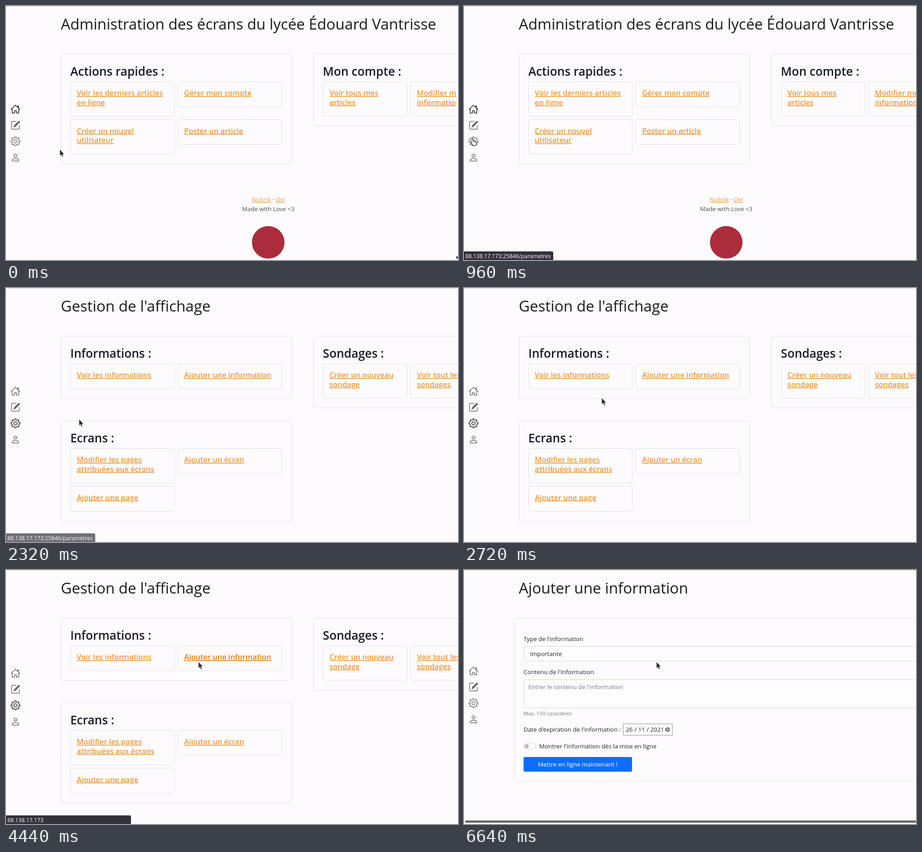
Animation, 998 px wide and 561 px high, one loop 6680 ms. Source, as an HTML page:

```html
<!DOCTYPE html>
<html lang="fr">
<head>
<meta charset="utf-8">
<title>Administration des écrans</title>
<style>
  html, body { margin: 0; width: 100%; height: 100%; overflow: hidden; background: #fdfbfe; }
  svg { display: block; width: 998px; height: 561px; }
  text { font-family: "Open Sans", "Noto Sans", sans-serif; font-size: 13.3px; fill: #23242c; white-space: pre; }
  .title { font-size: 33.2px; fill: #1a1b22; }
  .head { font-size: 26.2px; font-weight: 600; fill: #1a1b28; }
  .link { font-size: 16.4px; font-weight: 600; }
  .link, .a { fill: #ec9838; text-decoration: underline; }
  .hover { fill: #de7f0c; }
  .foot { text-anchor: middle; fill: #4c4d54; }
  .muted { fill: #737b88; }
  .small { font-size: 11.5px; }
  .url { font-size: 12.25px; fill: #fff; }
  .box { fill: none; stroke: #dfdee6; }
  .field { fill: #fdfdfe; stroke: #d0d2d6; }
  .icon { fill: none; stroke: #68686e; stroke-width: 1.1; stroke-linejoin: round; stroke-linecap: round; }
  .icon.on { stroke: #1c1c22; }
</style>
</head>
<body>
<svg viewBox="0 0 998 561">
  <path d="M0 .5H998" stroke="#cbcbc4"/>
  <g id="home"></g>
  <g id="display"></g>
  <g id="form"></g>
  <g id="menu"></g>
  <g id="edge"><path d="M994 1h4v560h-4z" fill="#fdfbfe"/><path d="M994 553h4v5h-4z" fill="#55555f"/></g>
  <g id="status">
    <path id="bubble" fill="#33313b"/>
    <text id="url" class="url" x="3" y="556.5"></text>
  </g>
  <path id="arrow" d="M0 0v14l3.200-2.600 2.300 5 2.300-1-2.200-4.900h4.400z" fill="#2a2a32" stroke="#fff" stroke-width=".5"/>
  <path id="hand" d="M-.5-1q1.400-2.200 2.800 0v4.500l5 1q3 .7 2.600 3.700l-1.200 4.700H2l-4.300-5.200q-1-2 1-1.800l.8.900zM4.500 4v2.500M7 4.500v2.200" fill="#fff" stroke="#2a2a32" stroke-width="1.1" stroke-linejoin="round"/>
</svg>
<script>
const LOOP = 6680, HOST = '88.138.17.173';
const SETTINGS = HOST + ':25846/parametres';
const el = id => document.getElementById(id);
const show = (id, on) => { el(id).style.display = on ? '' : 'none'; };

const text = (x, y, s, cls = '') => `<text x="${x}" y="${y}" class="${cls}">${s}</text>`;
const rect = (x, y, right, bottom, cls = 'box', r = 3.5) =>
  `<rect x="${x + .5}" y="${y + .5}" width="${right - x - 1}" height="${bottom - y - 1}" rx="${r}" class="${cls}"/>`;

// A link tile; "|" separates its lines
const tile = (x, y, right, label, id = '') => {
  const lines = label.split('|');
  return rect(x, y, right, y + (lines.length > 1 ? 77 : 56)) +
    `<g id="${id}">` + lines.map((s, i) => text(x + 14.3, y + 31 + i * 20.7, s, 'link')).join('') + '</g>';
};
const card = (x, y, right, bottom, head) => rect(x, y, right, bottom) + text(x + 21, y + 48, head, 'head');

el('home').innerHTML =
  text(121, 52, 'Administration des écrans du lycée Édouard Vantrisse', 'title') +
  card(121, 106, 631, 349, 'Actions rapides :') +
  tile(142, 167, 372, 'Voir les derniers articles|en ligne') +
  tile(379, 167, 609, 'Gérer mon compte') +
  tile(142, 250.5, 372, 'Créer un nouvel|utilisateur') +
  tile(379, 250.5, 609, 'Poster un article') +
  card(678.5, 106, 1100, 265, 'Mon compte :') +
  tile(700, 167, 886, 'Voir tous mes|articles') +
  tile(893, 167, 1080, 'Modifier mes|informations') +
  text(579, 432, '<tspan class="a">Nubrik</tspan> · <tspan class="a">Ovi</tspan>', 'foot') +
  text(579, 453, 'Made with Love &lt;3', 'foot') +
  '<circle cx="579" cy="522" r="36" fill="#ab2d3c"/>';

el('display').innerHTML =
  text(121, 52, "Gestion de l'affichage", 'title') +
  card(121, 106, 631, 245, 'Informations :') +
  tile(142, 167, 372, 'Voir les informations') +
  tile(379, 167, 609, 'Ajouter une information', 'add') +
  card(121, 292.5, 631, 516, 'Ecrans :') +
  tile(142, 354, 372, 'Modifier les pages|attribuées aux écrans') +
  tile(379, 354, 609, 'Ajouter un écran') +
  tile(142, 437.5, 372, 'Ajouter une page') +
  card(678.5, 106, 1100, 265, 'Sondages :') +
  tile(700, 167, 886, 'Créer un nouveau|sondage') +
  tile(893, 167, 1080, 'Voir tout les|sondages');

el('form').innerHTML =
  text(121, 52, 'Ajouter une information', 'title') +
  rect(110.5, 106, 1100, 467) +
  text(131.5, 156.5, "Type de l'information") +
  rect(131.5, 168, 1080, 201.5, 'field') +
  text(146, 189.5, 'Importante') +
  text(131.5, 230, "Contenu de l'information") +
  rect(131.5, 241.5, 1080, 305, 'field') +
  text(142, 263, "Entrer le contenu de l'information", 'muted') +
  text(131.5, 320.5, 'Max. 150 caractères', 'muted small') +
  text(131.5, 357, "Date d'expiration de l'information :") +
  '<rect x="351.5" y="340" width="108.5" height="25" fill="#fff" stroke="#85858a"/>' +
  text(357.5, 357, '26 / 11 / 2021') +
  '<circle cx="449.5" cy="352.5" r="5" fill="#66666a"/>' +
  '<path d="m447.5 350.5 4 4m0-4-4 4" stroke="#fff" stroke-width="1.3"/>' +
  rect(131.5, 382.5, 159, 396, 'field', 6.5) +
  '<circle cx="138.5" cy="389.3" r="4.6" fill="#b9b9bd"/>' +
  text(166, 394, "Montrer l'information dès la mise en ligne") +
  '<rect x="131.5" y="413" width="239.5" height="32.5" rx="3" fill="#0d6efd"/>' +
  '<text x="251" y="434" text-anchor="middle" style="fill:#fff">Mettre en ligne maintenant !</text>' +
  '<path d="M5 555.7H998" stroke="#66666a" stroke-width="5" stroke-linecap="round"/>';

// Eight-toothed wheel
const gear = 'M' + Array.from({ length: 32 }, (_, i) => {
  const a = (i - .5) * Math.PI / 16, r = i % 4 < 2 ? 7.5 : 6;
  return (8 + r * Math.sin(a)).toFixed(2) + ' ' + (8 - r * Math.cos(a)).toFixed(2);
}).join('L') + 'zM10.7 8a2.7 2.7 0 1 1-5.4 0a2.7 2.7 0 1 1 5.4 0z';
const icons = [
  'M.8 8.5 8 1.3l7.2 7.2M2.5 7v7.500h4v-4h3v4h4V7M12 5V2.5h.8v3.3',
  'M14.5 8v5.5a1 1 0 0 1-1 1h-11a1 1 0 0 1-1-1v-11a1 1 0 0 1 1-1H9M13.5 1.200l1.500 1.500-7.500 7.500-2.200.7.700-2.200zM12.800 2l1.500 1.500M13 3.200 6.800 9.400',
  gear,
  'M10.500 5a2.500 2.500 0 1 1-5 0a2.500 2.500 0 1 1 5 0zM2.500 13.500c0-2 2-3.500 5.500-3.500s5.500 1.500 5.500 3.500q0 .5-.5.5h-10q-.5 0-.5-.5z'
];
el('menu').innerHTML = icons.map((d, i) =>
  `<path class="icon" d="${d}" transform="translate(10.3 ${217.3 + i * 35.5}) scale(1.33)"/>`).join('');

// Pointer stops: time, x, y
const path = [[0, 119, 317], [440, 77, 297], [840, 18, 295], [2120, 18, 295], [2320, 161, 290], [3060, 425, 203], [LOOP, 425, 203]];
function pointer(t) {
  const i = path.findIndex(p => p[0] > t), [t0, x0, y0] = path[i - 1], [t1, x1, y1] = path[i];
  const k = (t - t0) / (t1 - t0);
  return [x0 + (x1 - x0) * k, y0 + (y1 - y0) * k];
}

function draw(t) {
  const page = t < 1920 ? 'home' : t < 4520 ? 'display' : 'form';
  for (const id of ['home', 'display', 'form']) show(id, id === page);
  show('edge', t < 40);

  const active = { home: 0, display: 2 }[page];
  [...el('menu').children].forEach((p, i) => p.classList.toggle('on', i === active));
  el('menu').setAttribute('transform', `translate(0 ${page === 'form' ? -5 : 0})`);
  el('add').firstChild.classList.toggle('hover', t >= 3040);

  const first = t < 2800;
  const visible = first ? t >= 920 && t < 2600 : t >= 3400 && t < 4800;
  show('status', visible);
  el('status').setAttribute('opacity', first ? Math.min(1, Math.max(0, 1 - (t - 2200) / 400)) : 1);
  el('bubble').setAttribute('d', `M0 542H${first ? 194 : 273}q3 0 3 3v16H0z`);
  el('url').textContent = first ? SETTINGS : t < 4320 ? SETTINGS + '/informations' : HOST;

  const onLink = (t >= 800 && t < 2140) || (t >= 3040 && t < 4320);
  const [x, y] = pointer(t);
  for (const id of ['arrow', 'hand']) {
    show(id, (id === 'hand') === onLink);
    el(id).setAttribute('transform', `translate(${x} ${y})`);
  }
}

const start = performance.now();
(function tick() {
  draw((performance.now() - start) % LOOP);
  requestAnimationFrame(tick);
})();
</script>
</body>
</html>
```
